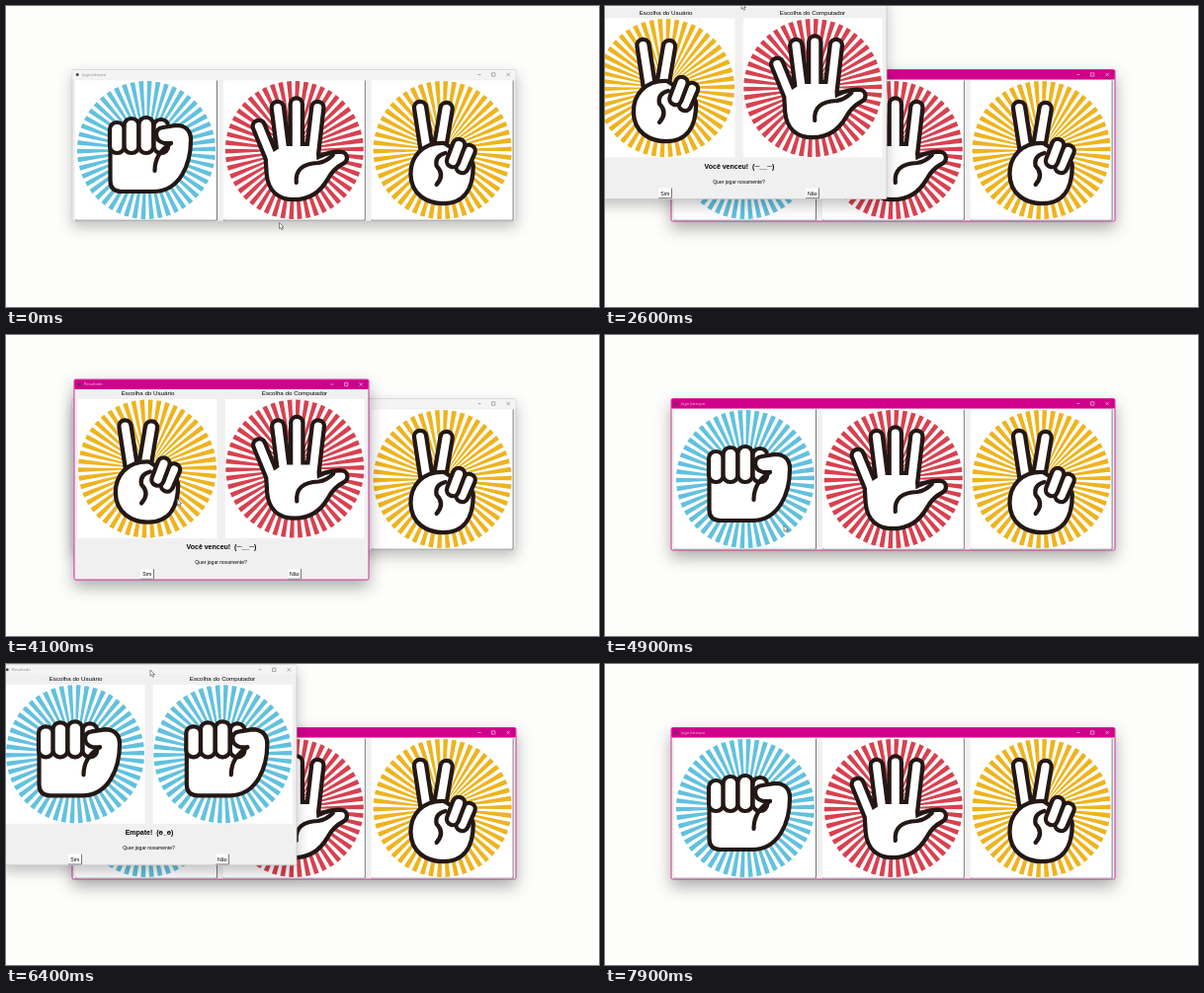
An HTML page that plays this animation: 600 px wide and 305 px high, repeating every 8 s.

```html
<!DOCTYPE html>
<html lang="pt">
<head>
<meta charset="utf-8">
<style>
html, body { margin: 0; width: 100%; height: 100%; overflow: hidden; background: #fdfefc; }
svg { display: block; width: 600px; height: 305px; font-family: "Liberation Sans", Arial, sans-serif; }
.win { --bar: #f4f4f4; --edge: #c9c9c9; --ink: #888; }
.win.focus { --bar: #d1008b; --edge: #d1008b; --ink: #f5c4e3; }
.frame { fill: #f0f0f0; stroke: var(--edge); stroke-width: .8; filter: drop-shadow(0 6px 7px rgba(0,0,0,.24)); }
.focus .frame { filter: drop-shadow(0 7px 8px rgba(0,0,0,.32)); }
.bar { fill: var(--bar); }
.title { font: 4px "Open Sans", sans-serif; fill: var(--ink); }
.ctl { fill: none; stroke: var(--ink); stroke-width: .7; }
.mid { text-anchor: middle; }
.ink { fill: #231815; stroke: #231815; stroke-width: 16.6; }
.skin { fill: #fff; stroke: #fff; stroke-width: 8; }
.line, .shape { fill: none; stroke: #231815; stroke-width: 4.2; }
.shape { fill: #fff; }
.ink, .skin, .line, .shape { stroke-linecap: round; stroke-linejoin: round; }
</style>
</head>
<body>
<svg id="stage" viewBox="0 0 600 305"></svg>
<script>
const path = (cls, d) => `<path class="${cls}" d="${d}"/>`;
const line = d => path('line', d);
const shape = d => path('shape', d);
// A blob is one path drawn thick in ink, then thinner in white
const blob = d => path('ink', d) + path('skin', d);

const knuckle = (x, top) =>
  `<rect class="shape" x="${x}" y="${top}" width="14.7" height="${3 - top}" rx="7"/>`;

const hands = {
  rock: ['#62c1de',
    shape('M-36.5 -10V31Q-36.5 42 -25 42H7C34 42 45 14 45 -10C45 -21 38 -25 30 -25Z') +
    knuckle(7.5, -31) + knuckle(-37, -28) + knuckle(-22.4, -32) + knuckle(-7.5, -33) +
    shape('M25 -7H18Q10 -9 10 -16Q10 -22 17 -23L30 -25C39 -25 45 -20 45 -10') +
    line('M8.5 21Q8.5 3 25 -7')],
  paper: ['#d8414f',
    blob('M-36 -24L-23 8M-17 -43L-11 5M2 -46.5V5M23.5 -43L18 5M-23 8L-11 0H18L19 17' +
      'Q34 7 47 8Q35 14 28 27Q18 44 0 44Q-20 44 -22 24Z') +
    line('M2 33Q0 14 24 13Q32 12 39 5')],
  scissors: ['#eeb41f',
    blob('M-22.5 -43L-15 6M4 -42L-4 6') +
    blob('M0 -1C-17 -1 -26 10 -26 24C-26 40 -14 48 1 48C18 48 25 36 25 16Z') +
    blob('M27 1L20 17') + blob('M16.5 -5L10.5 11') +
    line('M3 3Q-8 6 -6 16Q3 25 -6 35')]
};

const card = (name, x, y) => {
  const [color, hand] = hands[name];
  return `<g transform="translate(${x} ${y})">
    <rect x="-70.5" y="-70.5" width="141" height="141" fill="#fff"/>
    <circle r="35" fill="none" stroke="${color}" stroke-width="70"
      pathLength="50" stroke-dasharray=".55 .45" stroke-dashoffset=".4"/>
    ${hand}</g>`;
};

const text = (x, y, size, str, extra = '') =>
  `<text class="mid" x="${x}" y="${y}" font-size="${size}" ${extra}>${str}</text>`;

const bevel = (x, y, w, h) =>
  `<rect x="${x}" y="${y}" width="${w}" height="${h}" fill="#fff"/>
   <path d="M${x} ${y + h - .5}H${x + w - .5}V${y}" fill="none" stroke="#777"/>`;

const win = (id, w, h, title, body) => `<g id="${id}" class="win">
  <rect class="frame" width="${w}" height="${h}" rx="1.5"/>
  <rect class="bar" x=".3" y=".3" width="${w - .6}" height="9.7" rx="1"/>
  <circle cx="5.2" cy="5" r="1.5" fill="#444"/>
  <text class="title" x="10" y="6.3">${title}</text>
  <path class="ctl" d="M${w - 38.5} 5h3M${w - 24.5} 3.3h3.4v3.4h-3.4ZM${w - 9.5} 3.3l3.4 3.4m0 -3.4l-3.4 3.4"/>
  ${body}</g>`;

const button = (x, label) => bevel(x, 192, 14, 10.7) + text(x + 6.8, 199.3, 5.2, label);

const result = (id, user, computer, verdict) => win(id, 298, 203, 'Resultado',
  text(74.5, 16.4, 6.2, 'Escolha do Usuário') +
  text(223, 16.4, 6.2, 'Escolha do Computador') +
  card(user, 74, 90.5) + card(computer, 223.3, 90.5) +
  text(149, 172.3, 7, verdict, 'font-weight="bold"') +
  text(148.5, 187.2, 5, 'Quer jogar novamente?') +
  button(67, 'Sim') + button(216, 'Não'));

const choices = ['rock', 'paper', 'scissors'].map((name, i) => {
  const x = 75 + i * 149.8;
  return bevel(x - 72, 11, 144, 142) + card(name, x, 81.5);
}).join('');

document.getElementById('stage').innerHTML =
  win('game', 449, 153.5, 'Jogo Jokenpo', choices) +
  result('win1', 'scissors', 'paper', 'Você venceu!\u00a0 (─__─)') +
  result('win2', 'rock', 'rock', 'Empate!\u00a0 (ө_ө)') +
  '<path id="cursor" d="M0 0V6.2L1.5 4.9L2.5 7.2L3.6 6.7L2.6 4.5H4.5Z" fill="#fff" stroke="#444" stroke-width=".6"/>';

const $ = id => document.getElementById(id);
const place = (id, [x, y]) => $(id).setAttribute('transform', `translate(${x} ${y})`);
const show = (id, on) => $(id).style.display = on ? '' : 'none';
const focus = (id, on) => $(id).classList.toggle('focus', on);

// Eased position along [time, x, y] keys
function track(keys, t) {
  const i = keys.findIndex(k => k[0] > t);
  if (i < 1) return keys.at(i).slice(1);
  const [a, b] = [keys[i - 1], keys[i]];
  const p = (t - a[0]) / (b[0] - a[0]), e = p * p * (3 - 2 * p);
  return [1, 2].map(n => a[n] + (b[n] - a[n]) * e);
}

const rounds = [
  { id: 'win1', open: 900, grab: 2700, close: 4600, path: [[2700, -13, -7.5], [3300, 69, 45]] },
  { id: 'win2', open: 5300, grab: 6500, close: 7600, path: [[6500, -4, .8], [7100, 70, 36]] }
];
const pointer = [
  [100, 276.5, 219.5], [700, 397, 140], [1800, 397, 140], [2500, 138, -3], [2700, 138, -3],
  [3300, 220, 49.5], [3700, 220, 49.5], [4400, 143, 242], [4600, 143, 242], [4900, 181, 193],
  [5500, 181, 193], [6300, 146, 6], [6500, 146, 6], [7100, 220, 41.2], [7500, 143, 233]
];

place('game', [67, 64.5]);
function draw(now) {
  const t = Math.floor(now % 8000 / 100) * 100;
  let gameFocus = t >= 700;
  for (const { id, open, grab, close, path } of rounds) {
    const held = t >= grab && t < close;
    show(id, t >= open && t < close);
    focus(id, held);
    place(id, track(path, t));
    if (held) gameFocus = false;
  }
  focus('game', gameFocus);
  place('cursor', track(pointer, t));
  show('cursor', t < 7800);
}

const start = performance.now();
(function tick() {
  draw(performance.now() - start);
  requestAnimationFrame(tick);
})();
</script>
</body>
</html>
```
